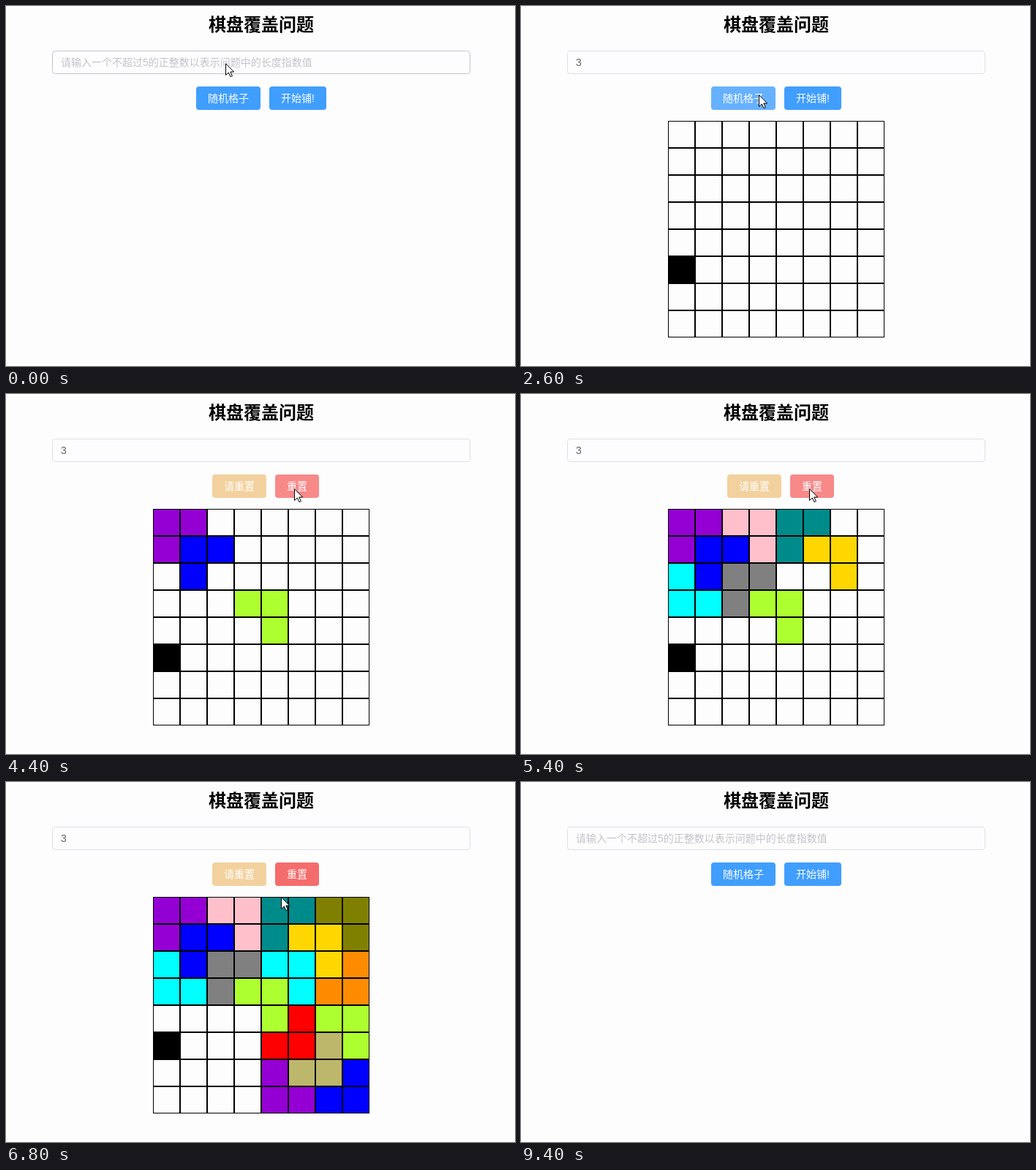
An HTML page that plays this animation: 696 px wide and 492 px high, repeating every 9800 ms.

```html
<!DOCTYPE html>
<html lang="zh-CN">
<head>
<meta charset="utf-8">
<title>棋盘覆盖问题</title>
<style>
  html, body { margin: 0; width: 100%; height: 100%; overflow: hidden; background: #fdfdfd; }
  svg { display: block; font: 14px "Liberation Sans", "Noto Sans CJK SC", "Noto Sans CJK", sans-serif; }
  .title { font-size: 24px; font-weight: bold; }
  .middle { text-anchor: middle; }
</style>
</head>
<body>
<svg id="stage" width="696" height="492" viewBox="0 0 696 492"></svg>
<script>
const LOOP = 9800, STEP = 200;
const SIZE = 8, CELL = 37, LEFT = 201, TOP = 157;
const TIME = { focus: 600, type: 800, random: 2000, reroll: 2600, start: 3800, firstTile: 4000, reset: 8800, leave: 9400 };
const TILE_INTERVAL = 180;
const PAPER = '#fdfdfd', BLUE = '#409eff', PALE_BLUE = '#66b1ff';
const COLORS = ['greenyellow', 'blue', 'darkviolet', 'pink', 'gray', 'cyan', 'gold',
  'darkcyan', 'olive', 'darkorange', 'cyan', 'darkkhaki', 'red'];
const HOLE = [5, 0], FIRST_HOLE = [2, 7];
const PATH = [[0, 300, 78], [1000, 300, 78], [1600, 325, 121], [2600, 325, 121], [3400, 394, 129],
  [6000, 394, 129], [6800, 376, 157], [7600, 376, 157], [8000, 376, 154], [8400, 394, 128],
  [8800, 394, 128], [9200, 400, 441], [LOOP, 400, 441]];

// Divide and conquer: one L-shaped tile at the centre, then each quadrant clockwise.
const tiles = [];
function cover(row, col, size, hole) {
  const half = size / 2;
  if (half < 1) return;
  const midRow = row + half, midCol = col + half;
  const quadrants = [[0, 0], [0, 1], [1, 1], [1, 0]].map(([down, right]) => {
    const holds = (hole[0] >= midRow) == down && (hole[1] >= midCol) == right;
    const inner = [midRow - 1 + down, midCol - 1 + right];
    return { row: row + down * half, col: col + right * half, holds, hole: holds ? hole : inner };
  });
  tiles.push(quadrants.filter(q => !q.holds).map(q => q.hole));
  quadrants.forEach(q => cover(q.row, q.col, half, q.hole));
}
cover(0, 0, SIZE, HOLE);

const rect = (x, y, w, h, fill, extra = '') =>
  `<rect x="${x}" y="${y}" width="${w}" height="${h}" fill="${fill}" ${extra}/>`;
const text = (x, y, fill, label, type = '') =>
  `<text x="${x}" y="${y}" fill="${fill}" class="${type}">${label}</text>`;

function cursorAt(t) {
  const next = PATH.findIndex(p => p[0] > t);
  const [t0, x0, y0] = PATH[next - 1], [t1, x1, y1] = PATH[next];
  const k = (t - t0) / (t1 - t0);
  return { x: Math.round(x0 + (x1 - x0) * k), y: Math.round(y0 + (y1 - y0) * k) };
}

function button(x, width, label, fill, hoverFill, cursor) {
  const hovered = cursor.x >= x && cursor.x < x + width && cursor.y >= 110 && cursor.y < 142;
  return rect(x, 110, width, 32, hovered ? hoverFill : fill, 'rx="4"') +
    text(x + width / 2, 131, '#fff', label, 'middle');
}

function board(t) {
  const fills = new Map();
  const paint = ([row, col], color) => fills.set(row * SIZE + col, color);
  paint(t < TIME.reroll ? FIRST_HOLE : HOLE, '#000');
  const count = Math.max(0, Math.floor((t - TIME.firstTile) / TILE_INTERVAL) + 1);
  tiles.slice(0, count).forEach((cells, i) => cells.forEach(c => paint(c, COLORS[i % COLORS.length])));
  let out = '';
  for (let i = 0; i < SIZE * SIZE; i++) {
    const x = LEFT + i % SIZE * CELL, y = TOP + Math.floor(i / SIZE) * CELL;
    out += rect(x + .5, y + .5, CELL - 1, CELL - 1, fills.get(i) || PAPER, 'stroke="#000"');
  }
  return out;
}

function draw(t) {
  const cursor = cursorAt(t);
  const cleared = t >= TIME.reset, running = t >= TIME.start && !cleared;
  const typed = t >= TIME.type && !cleared;
  const border = t < TIME.focus ? '#c0c4cc' : t < TIME.random ? BLUE : '#dcdfe6';

  let out = text(349, 34, '#000', '棋盘覆盖问题', 'title middle');
  out += rect(63.5, 61.5, 571, 31, PAPER, `rx="4" stroke="${border}"`);
  out += typed ? text(75, 82, '#606266', '3')
    : text(75, 82, '#c0c4cc', '请输入一个不超过5的正整数以表示问题中的长度指数值');

  if (running) {
    out += button(282, 74, '请重置', '#f3d19e', '#f3d19e', cursor);
    out += button(368, 60, '重置', '#f56c6c', '#f78989', cursor);
  } else {
    const focused = t >= TIME.random && !cleared;
    out += button(260, 88, '随机格子', focused ? PALE_BLUE : BLUE, PALE_BLUE, cursor);
    out += button(360, 78, '开始铺!', BLUE, PALE_BLUE, cursor);
  }
  if (t >= TIME.random && !cleared) out += board(t);
  if (t < TIME.leave) {
    out += `<path transform="translate(${cursor.x} ${cursor.y})" fill="#fff" stroke="#000"
      d="M.5 .8V16.5L4.3 13 7 18.6 9.4 17.5 6.8 12H11.7Z"/>`;
  }
  return out;
}

const stage = document.getElementById('stage');
let shown = -1;
function tick() {
  const t = Math.floor(performance.now() % LOOP / STEP) * STEP;
  if (t !== shown) stage.innerHTML = draw(shown = t);
  requestAnimationFrame(tick);
}
tick();
</script>
</body>
</html>
```
